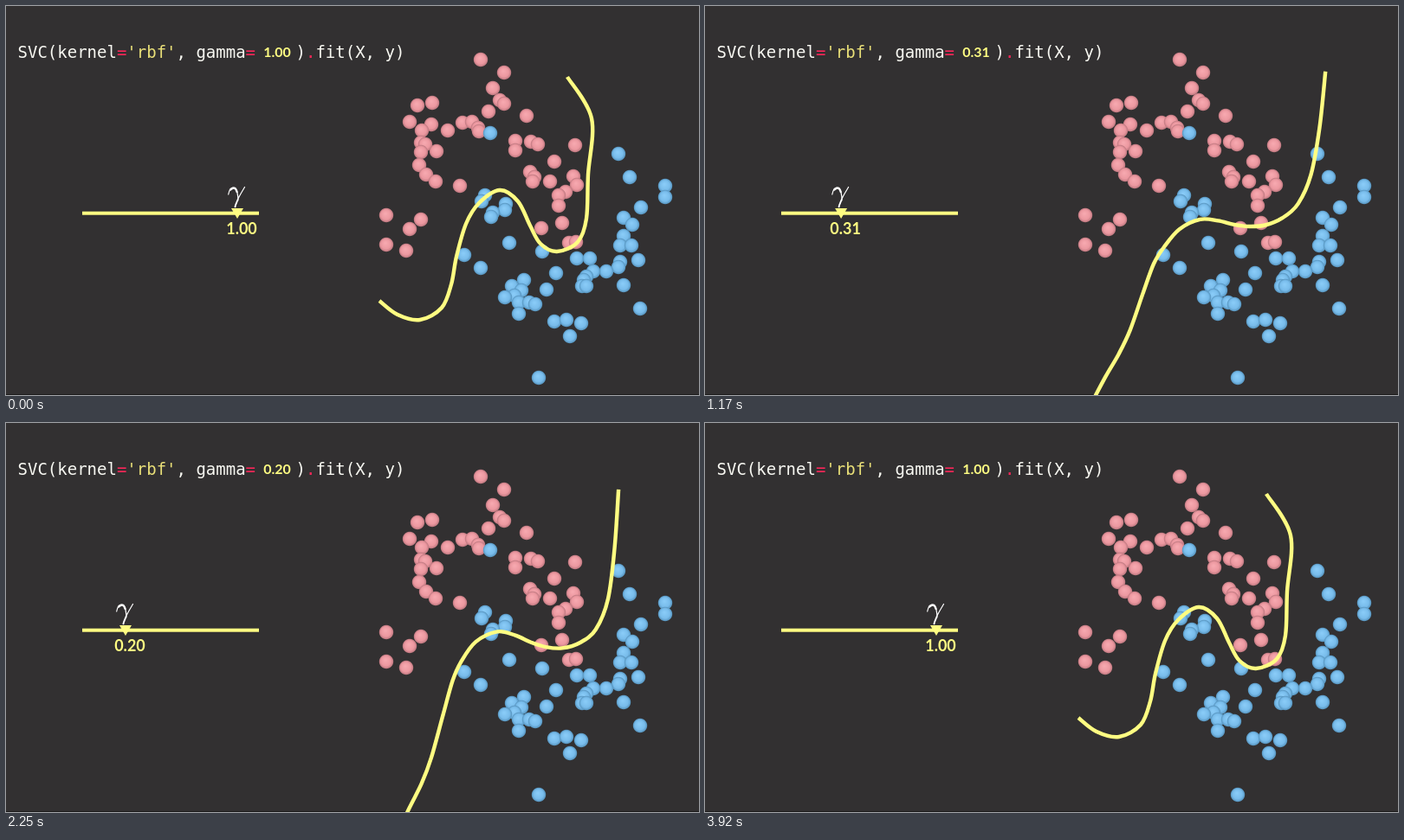
These frames come from a looping animation (800 px wide and 450 px high, 4000 ms). An HTML page with a canvas:

```html
<!DOCTYPE html>
<html lang="en">
<head>
<meta charset="utf-8">
<title>SVC gamma</title>
<style>
html, body { margin: 0; width: 100%; height: 100%; overflow: hidden; background: #323031; }
canvas { display: block; width: 800px; height: 450px; }
</style>
</head>
<body>
<canvas id="stage" width="800" height="450"></canvas>
<script>
const ctx = document.getElementById('stage').getContext('2d');
const LOOP = 4000, FRAME = 1000 / 12;
const YELLOW = '#fffd82', WHITE = '#f8f8f2', RED = '#f92659', STRING = '#e9df78';
const GAMMA_MIN = 0.01;

const pairs = list => list.reduce((out, v, i) => (i % 2 ? out[out.length - 1].push(v) : out.push([v]), out), []);
const mix = (a, b, k) => a + (b - a) * k;
const clamp = v => Math.min(1, Math.max(0, v));
const ease = v => 0.5 - 0.5 * Math.cos(Math.PI * clamp(v));

const pinkDots = pairs([
  548,62, 575,77, 562,95, 570,109, 575,113, 557,122, 601,127, 475,115, 492,112, 466,134,
  491,137, 480,144, 510,144, 527,135, 538,134, 545,141, 546,145, 479,158, 484,160, 479,169,
  497,168, 477,184, 485,195, 496,203, 524,208, 588,156, 588,167, 606,157, 614,160, 657,161,
  633,180, 605,192, 610,198, 608,203, 628,203, 655,197, 659,207, 646,215, 638,219, 638,231,
  642,251, 618,257, 650,274, 658,273, 439,242, 479,247, 466,258, 439,276, 462,283]);

const blueDots = pairs([
  559,147, 707,171, 720,198, 761,208, 761,221, 733,233, 713,245, 723,253, 713,266, 709,277,
  722,277, 730,294, 709,296, 707,302, 693,307, 678,307, 659,292, 674,292, 670,313, 667,317,
  665,324, 670,324, 713,323, 732,350, 635,309, 624,328, 619,284, 581,274, 529,288, 548,303,
  553,219, 549,226, 577,229, 576,236, 562,239, 560,244, 598,317, 584,324, 595,329, 587,335,
  576,337, 592,343, 604,343, 611,345, 592,356, 633,365, 647,363, 664,367, 651,382, 615,430]);

// Decision boundary at a few values of gamma, matched point by point.
const boundaries = [
  { g: 0.02, pts: pairs([428,380, 450,358, 470,340, 490,324, 510,309, 528,299, 550,288, 570,279, 590,270,
    610,260, 630,249, 648,238, 665,225, 682,209, 700,188, 718,162, 738,125, 754,72]) },
  { g: 0.29, pts: pairs([448,490, 466,450, 480,421, 491,390, 504,340, 515,298, 524,276, 541,252, 566,240,
    587,245, 605,254, 622,260, 641,262, 662,256, 680,241, 694,205, 701,145, 705,77]) },
  { g: 0.51, pts: pairs([428,381, 445,389, 465,391, 490,380, 510,347, 519,298, 529,258, 543,233, 566,217,
    585,225, 603,247, 620,268, 639,276, 660,268, 674,241, 677,170, 679,110, 674,80]) },
  { g: 0.66, pts: pairs([429,371, 447,382, 468,385, 495,376, 513,346, 520,300, 529,262, 545,229, 570,213,
    590,224, 604,250, 619,269, 638,276, 658,268, 671,244, 676,190, 679,115, 670,80]) },
  { g: 1, pts: pairs([431,341, 452,357, 478,363, 503,349, 514,322, 520,290, 531,252, 546,228, 570,213,
    591,226, 605,254, 617,275, 636,284, 660,273, 670,246, 672,195, 676,130, 648,82]) }
];

function gammaAt(t) {
  const down = ease((t - 346) / 1312), up = ease((t - 1876) / 1312);
  return mix(1, GAMMA_MIN, down - up);
}

function boundaryAt(g) {
  const i = Math.max(1, boundaries.findIndex(b => b.g >= g));
  const a = boundaries[i - 1], b = boundaries[i];
  const k = clamp((g - a.g) / (b.g - a.g));
  return a.pts.map(([x, y], n) => [mix(x, b.pts[n][0], k), mix(y, b.pts[n][1], k)]);
}

function ballSprite(light, base, edge) {
  const c = document.createElement('canvas');
  c.width = c.height = 40;
  const s = c.getContext('2d');
  const fill = s.createRadialGradient(18, 16, 1, 20, 20, 16.4);
  fill.addColorStop(0, light);
  fill.addColorStop(0.68, base);
  fill.addColorStop(1, edge);
  s.fillStyle = fill;
  s.arc(20, 20, 16.4, 0, Math.PI * 2);
  s.fill();
  return c;
}
const pinkBall = ballSprite('#f7a9b0', '#ec98a0', '#bd777f');
const blueBall = ballSprite('#8accf8', '#78bceb', '#5693bd');

function text(str, x, y, font, color, align = 'left') {
  ctx.font = font;
  ctx.fillStyle = color;
  ctx.textAlign = align;
  ctx.fillText(str, x, y);
}

function drawCode(value) {
  const font = '19px "DejaVu Sans Mono", monospace';
  const run = (x, parts) => parts.forEach(([str, color]) => {
    text(str, x, 60, font, color);
    x += ctx.measureText(str).width;
  });
  run(13.5, [['SVC(kernel', WHITE], ['=', RED], ["'rbf'", STRING], [', gamma', WHITE], ['=', RED]]);
  run(334.5, [[')', WHITE], ['.', RED], ['fit(X, y)', WHITE]]);
  text(value, 313, 59, 'bold 16px Lato, sans-serif', YELLOW, 'center');
}

function drawGammaSign(x) {
  ctx.save();
  ctx.translate(x, 0);
  ctx.strokeStyle = '#fff';
  ctx.lineCap = 'round';
  ctx.lineWidth = 1.2;
  ctx.stroke(new Path2D('M-10.3 218C-8.5 208-2 207.5 0 216Q1.2 221 .7 225M8.5 209.5C6 214 2.5 219 .6 224'));
  ctx.lineWidth = 2.3;
  ctx.stroke(new Path2D('M-8 212.6Q-2.5 207.5-.4 215'));
  ctx.lineWidth = 1.9;
  ctx.stroke(new Path2D('M.6 224C-1 228-2.3 230-2.5 232.4'));
  ctx.restore();
}

function drawSlider(g, value) {
  const x = 106.6 + 160.4 * g;
  ctx.fillStyle = YELLOW;
  ctx.fillRect(88, 237.7, 204, 4);
  ctx.beginPath();
  ctx.moveTo(x - 7, 234);
  ctx.lineTo(x + 7, 234);
  ctx.lineTo(x, 246);
  ctx.fill();
  drawGammaSign(x);
  text(value, x + 5, 264, 'bold 18px Lato, sans-serif', YELLOW, 'center');
}

function drawCurve(pts) {
  const at = i => pts[Math.min(pts.length - 1, Math.max(0, i))];
  ctx.beginPath();
  ctx.moveTo(...pts[0]);
  for (let i = 0; i < pts.length - 1; i++) {
    const [p, a, b, n] = [at(i - 1), at(i), at(i + 1), at(i + 2)];
    ctx.bezierCurveTo(
      a[0] + (b[0] - p[0]) / 6, a[1] + (b[1] - p[1]) / 6,
      b[0] - (n[0] - a[0]) / 6, b[1] - (n[1] - a[1]) / 6, b[0], b[1]);
  }
  ctx.strokeStyle = YELLOW;
  ctx.lineWidth = 4.4;
  ctx.lineJoin = 'round';
  ctx.stroke();
}

function draw(now) {
  const t = Math.floor((now % LOOP) / FRAME + 0.1) * FRAME;
  const g = gammaAt(t), value = g.toFixed(2);
  ctx.fillStyle = '#323031';
  ctx.fillRect(0, 0, 800, 450);
  ctx.fillStyle = '#1c1b1b';
  ctx.fillRect(0, 449, 800, 1);
  drawCode(value);
  drawSlider(g, value);
  pinkDots.forEach(([x, y]) => ctx.drawImage(pinkBall, x - 10, y - 10, 20, 20));
  blueDots.forEach(([x, y]) => ctx.drawImage(blueBall, x - 10, y - 10, 20, 20));
  // The boundary runs one step ahead of the slider.
  drawCurve(boundaryAt(gammaAt(t + FRAME)));
}

let start;
function tick(now) {
  start ??= now;
  draw(now - start);
  requestAnimationFrame(tick);
}
draw(0);
requestAnimationFrame(tick);
</script>
</body>
</html>
```
